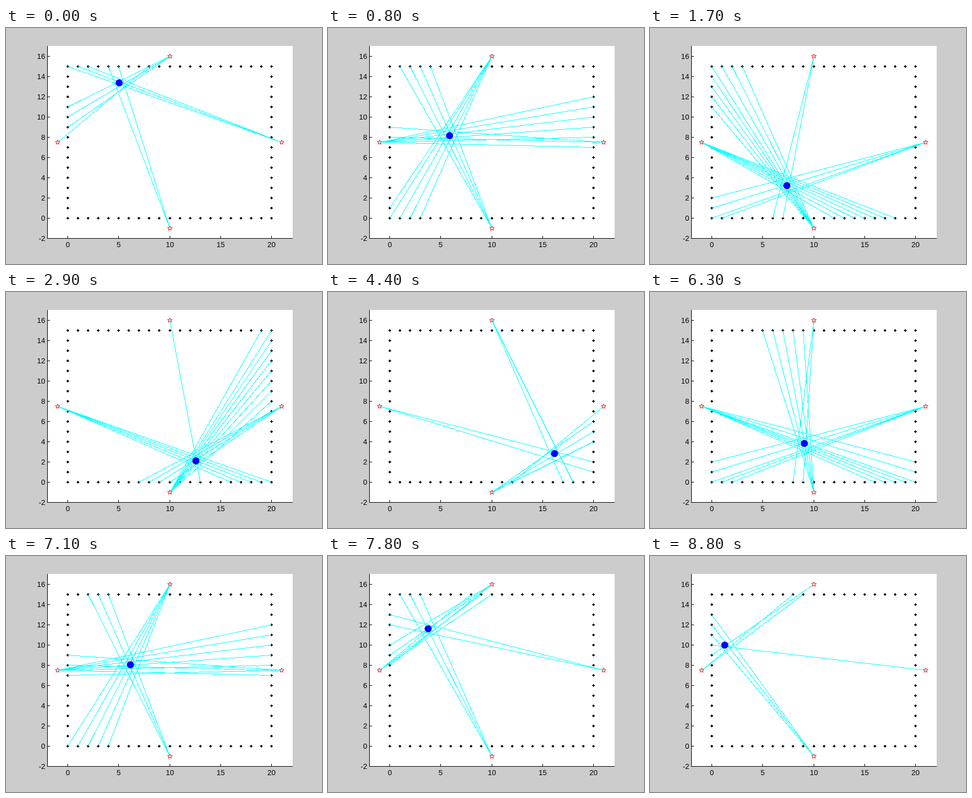
These frames come from a looping animation (560 px wide and 420 px high, 8900 ms). An HTML page:

```html
<!DOCTYPE html>
<html lang="en">
<head>
<meta charset="utf-8">
<title>Link crossing</title>
<style>
html, body { margin: 0; width: 100%; height: 100%; overflow: hidden; background: #ccc; }
svg { display: block; width: 560px; height: 420px; }
text { font: 13px "Liberation Sans", Arial, sans-serif; }
</style>
</head>
<body>
<svg id="stage" viewBox="0 0 560 420">
  <rect width="560" height="420" fill="#ccc"/>
  <rect x="73" y="32" width="435" height="343" fill="#fff"/>
  <path id="axes" fill="none" stroke="#000" shape-rendering="crispEdges"/>
  <g id="labels"></g>
  <path id="dots" shape-rendering="crispEdges"/>
  <path id="stars" fill="none" stroke="#f00"/>
  <path id="links" fill="none" stroke="#0ff" shape-rendering="crispEdges"/>
  <circle id="ball" r="6.3" fill="#00f"/>
</svg>
<script>
const LOOP = 8900, STEP = 100, EXCESS = 0.1;
const $ = id => document.getElementById(id);
const px = x => Math.round(109 + 18.05 * x) + 0.5;
const py = y => Math.round(338 - 18 * y) + 0.5;

// Way points of the ball: step, x, y
const way = [
  [0, 5.02, 13.4], [17, 7.36, 3.22], [29, 12.6, 2.1], [44, 16.2, 2.83],
  [63, 9.1, 3.83], [78, 3.75, 11.6], [88, 1.27, 10]
];

const stars = [[10, 16], [21, 7.5], [10, -1], [-1, 7.5]];
const dots = [];
for (let x = 0; x <= 20; x++) dots.push([x, 0], [x, 15]);
for (let y = 1; y < 15; y++) dots.push([0, y], [20, y]);

const dist = (a, b) => Math.hypot(a[0] - b[0], a[1] - b[1]);

// Each star only reaches the dots inside its beam
const links = [];
for (const s of stars) {
  const upright = s[0] === 10;
  for (const d of dots) {
    const reach = upright ? Math.abs(d[1] - s[1]) >= 5 : Math.abs(d[0] - s[0]) >= 9;
    if (reach) {
      links.push({ s, d, len: dist(s, d), path: `M${px(s[0])} ${py(s[1])}L${px(d[0])} ${py(d[1])}` });
    }
  }
}

function slope(i, k) {
  const a = way[Math.max(i - 1, 0)], b = way[Math.min(i + 1, way.length - 1)];
  return (b[k] - a[k]) / (b[0] - a[0]);
}

function ballAt(step) {
  let i = 0;
  while (i < way.length - 2 && step >= way[i + 1][0]) i++;
  const a = way[i], b = way[i + 1], span = b[0] - a[0];
  const u = (step - a[0]) / span, v = 1 - u;
  return [1, 2].map(k =>
    v * v * (1 + 2 * u) * a[k] + u * u * (3 - 2 * u) * b[k] +
    span * u * v * (v * slope(i, k) - u * slope(i + 1, k)));
}

function starPath([x, y]) {
  let p = "";
  for (let i = 0; i < 10; i++) {
    const r = i % 2 ? 1.8 : 4.4, a = Math.PI * (i / 5 - 0.5);
    p += (i ? "L" : "M") + (px(x) + r * Math.cos(a)).toFixed(2) + " " + (py(y) + r * Math.sin(a)).toFixed(2);
  }
  return p + "Z";
}

function label(x, y, value, anchor) {
  const t = document.createElementNS("http://www.w3.org/2000/svg", "text");
  t.setAttribute("x", x);
  t.setAttribute("y", y);
  t.setAttribute("text-anchor", anchor);
  t.textContent = value;
  $("labels").append(t);
}

function drawPlot() {
  let axes = "M73.5 32V375M73 374.5H508";
  for (let x = 0; x <= 20; x += 5) {
    axes += `M${px(x)} 374V370`;
    label(px(x), 390, x, "middle");
  }
  for (let y = -2; y <= 16; y += 2) {
    axes += `M74 ${py(y)}H78`;
    label(69.5, py(y) + 4.5, y, "end");
  }
  $("axes").setAttribute("d", axes);
  $("dots").setAttribute("d", dots.map(([x, y]) =>
    `M${px(x) - 2.6} ${py(y)}l2.6 -2.6 2.6 2.6 -2.6 2.6Z`).join(""));
  $("stars").setAttribute("d", stars.map(starPath).join(""));
}

let shown = -1;
function draw(ms) {
  const step = Math.floor(ms % LOOP / STEP);
  if (step !== shown) {
    shown = step;
    const p = ballAt(step);
    // A link lights up while the ball is inside its narrow ellipse
    $("links").setAttribute("d", links
      .filter(l => dist(l.s, p) + dist(l.d, p) - l.len < EXCESS)
      .map(l => l.path).join(""));
    $("ball").setAttribute("cx", px(p[0]));
    $("ball").setAttribute("cy", py(p[1]));
  }
}

drawPlot();
draw(0);
const start = performance.now();
(function tick() {
  draw(performance.now() - start);
  requestAnimationFrame(tick);
})();
</script>
</body>
</html>
```
